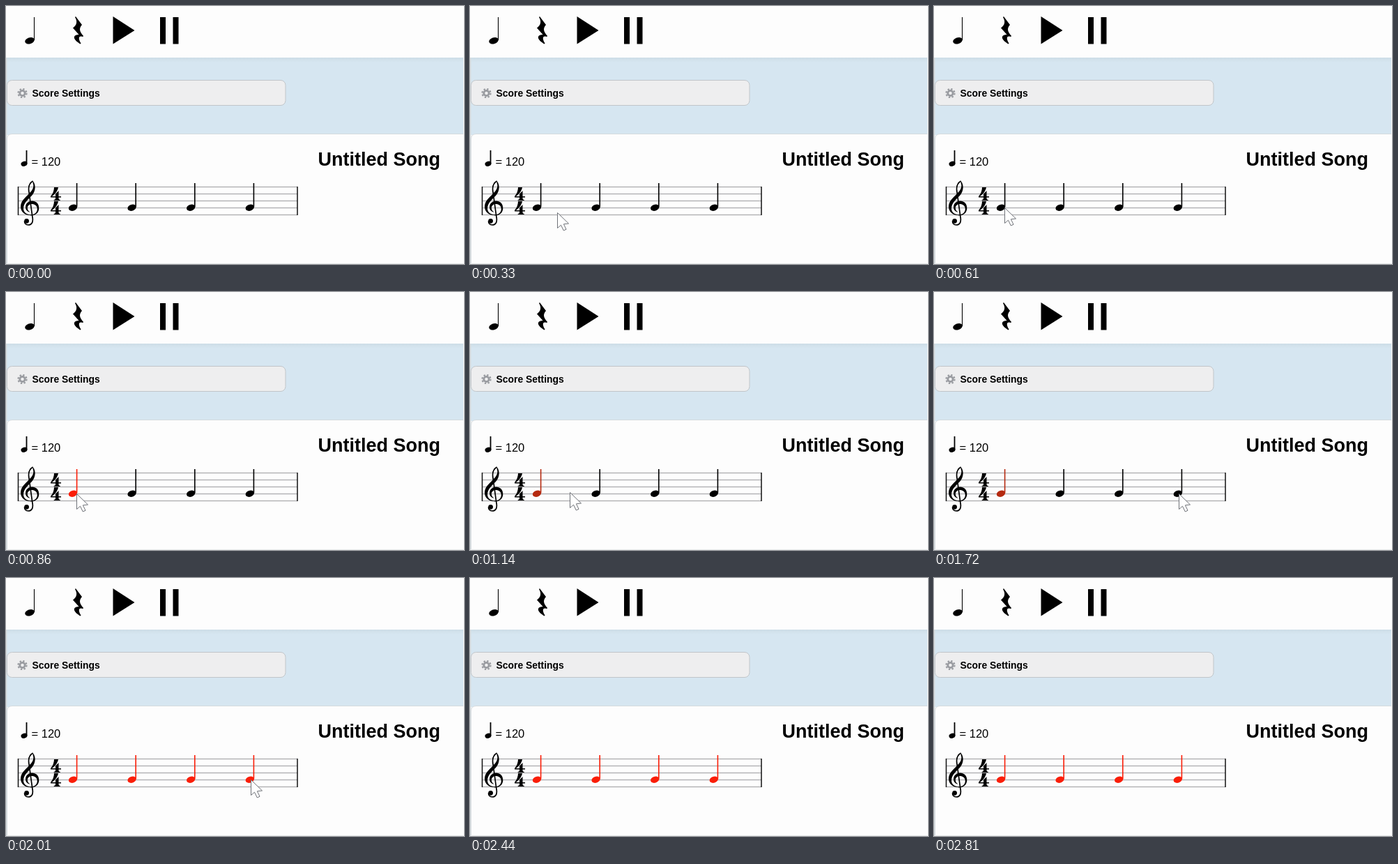
Recreate the animation shown at these times as an HTML page. Size 657 by 370 pixels, loop 2910 ms.

```html
<!DOCTYPE html>
<html lang="en">
<head>
<meta charset="utf-8">
<title>Score editor</title>
<style>
html, body { margin: 0; width: 100%; height: 100%; overflow: hidden; background: #fdfdfd; }
svg { display: block; width: 657px; height: 370px; }
text { font-family: "Liberation Sans", Arial, sans-serif; }
.bold { font-weight: bold; }
</style>
</head>
<body>
<svg viewBox="0 0 657 370">
  <defs>
    <linearGradient id="band" x2="0" y2="1">
      <stop offset="0" stop-color="#cddde7"/>
      <stop offset=".06" stop-color="#d6e6f1"/>
      <stop offset="1" stop-color="#d6e6f1"/>
    </linearGradient>
    <path id="four" d="M69 260h6Q74 267 66 273h5v-3.5l4.5-4.5v8h3.5v1.6h-3.5v1.5q0 1.8 2.2 2v.9h-9v-.9q2.3-.2 2.3-2v-1.5h-7v-1.6Q69 267 69 260z"/>
  </defs>

  <!-- toolbar -->
  <ellipse cx="34" cy="49.7" rx="7" ry="4.5" transform="rotate(-18 34 49.7)"/>
  <path d="M40.5 16V49" stroke="#000" stroke-width="1.1"/>
  <path d="M100 15L109 27C104.5 32 105 36 111 43L110.4 44C105 42 102.5 45 107.5 53.5L106.8 54.5C97 49 94 41.5 104.5 41L96 31.5C102 27 102.5 22 99 16z"/>
  <path d="M153.500 15L184.500 35L153.500 54.500zM221 16h8v38.500h-8zM239.500 16h8v38.500h-8z"/>

  <!-- settings bar -->
  <rect y="74" width="656" height="111" fill="url(#band)"/>
  <rect y="74" width="1.500" height="296" fill="#d8dde0"/>
  <rect x="1.500" y="106.500" width="399.500" height="36" rx="7" fill="#eeeeef" stroke="#c1c5c9"/>
  <g fill="none" stroke="#999ba0">
    <circle cx="23.500" cy="125" r="3.700" stroke-width="2.800"/>
    <circle cx="23.500" cy="125" r="6" stroke-width="2.200" stroke-dasharray="2.400 2.312"/>
  </g>
  <text class="bold" x="37.500" y="130" font-size="13.900">Score Settings</text>

  <!-- score -->
  <path d="M1.500 370V191Q1.500 183.500 9 183.500H656V370z" fill="#fdfdfd"/>
  <path d="M1.500 369V191Q1.500 183.500 9 183.500H656" fill="none" stroke="#d5dade"/>
  <path d="M2 369.500H656" stroke="#e8eaeb"/>
  <ellipse cx="26" cy="226.200" rx="4.600" ry="3.500" transform="rotate(-20 26 226.200)"/>
  <path d="M29.500 207V226" stroke="#000" stroke-width="1.800"/>
  <text x="36.500" y="228.500" font-size="16.500">= 120</text>
  <text class="bold" x="447.500" y="229" font-size="27">Untitled Song</text>
  <path d="M17 259.500H418M17 269.500H418M17 279.500H418M17 289.500H418M17 299.500H418" stroke="#b4b4b6" stroke-width="1.500"/>
  <path d="M17.500 259V300M418 259V300" stroke="#111" stroke-width="1.500"/>
  <path d="M38.500 250.500C43.500 257 42.500 266 36.500 272.500C30 279 25.500 283 25 290C25 296 30 299.500 36 299.500L36 300.300C28 300.500 21 296 21 287.500C21 279.500 28 274.500 34 268C39 263 40.500 258 38.500 254z"/>
  <path d="M35 300.300C41.500 301 47.300 297 47.300 290C47.300 283 42.500 279.600 37.500 279.600C31.500 279.600 28 284 28 288.500C28 292 30 294.500 33.500 295.800L33.800 295C31.500 293.500 30.800 291.500 30.800 289.500C31 286 34 284 37 284C41 284 44.800 286.500 44.800 291C44.800 296 41 299.500 35 299.300z"/>
  <path d="M38.500 251C33.500 254 31.500 259 33 267L38 303C39.500 311 36 314 32 314C28 314 26.500 311 26.500 308.500" fill="none" stroke="#000" stroke-width="1.700"/>
  <circle cx="29.600" cy="308.300" r="3.400"/>
  <use href="#four"/>
  <use href="#four" y="20"/>
  <g id="notes"></g>
  <path id="cursor" d="M.5 .5V22.500L5.500 18.200L9.300 26L13 24.300L9.400 16.800L16.500 16z" fill="#fff" stroke="#6f7278" stroke-linejoin="round"/>
</svg>
<script>
const LOOP = 2910;
const ticks = [0, 100, 210, 330, 450, 530, 610, 710, 860, 1000, 1090, 1180, 1270, 1360,
  1440, 1510, 1620, 1720, 1820, 1910, 2010, 2120, 2280, 2360, 2440, 2530, 2810];
// time, x, y of the pointer tip
const path = [[100, 158, 308], [330, 125, 296], [530, 103, 289], [610, 101, 289], [1000, 101, 289],
  [1180, 185, 284], [1440, 313, 282], [1620, 351, 289], [2120, 351, 289], [2360, 385, 372]];
const firstClick = 710, leave = 1000, rangeClick = 1820;
const red = '#fa1e08', darkRed = '#b52a10';

const notes = document.getElementById('notes');
const cursor = document.getElementById('cursor');
for (let i = 0; i < 4; i++) {
  const x = 96 + i * 84.6;
  notes.innerHTML += `<g><ellipse cx="${x}" cy="289.200" rx="6.300" ry="4.500" transform="rotate(-18 ${x} 289.200)"/>
    <rect x="${x + 4.8}" y="254" width="1.600" height="34"/></g>`;
}

function pointerAt(t) {
  const i = path.findIndex(p => p[0] > t);
  if (i < 1) return null;
  const [t0, x0, y0] = path[i - 1], [t1, x1, y1] = path[i];
  const k = (t - t0) / (t1 - t0);
  return [x0 + (x1 - x0) * k, y0 + (y1 - y0) * k];
}

function noteColor(i, t) {
  if (t >= rangeClick) return red;
  if (i || t < firstClick) return '#000';
  return t < leave ? red : darkRed;
}

function draw(now) {
  const time = now % LOOP;
  const t = ticks.findLast(v => v <= time);
  const tip = pointerAt(t);
  cursor.style.display = tip ? '' : 'none';
  if (tip) cursor.setAttribute('transform', `translate(${tip.map(Math.round)})`);
  [...notes.children].forEach((n, i) => n.setAttribute('fill', noteColor(i, t)));
  requestAnimationFrame(draw);
}
draw(0);
</script>
</body>
</html>
```
